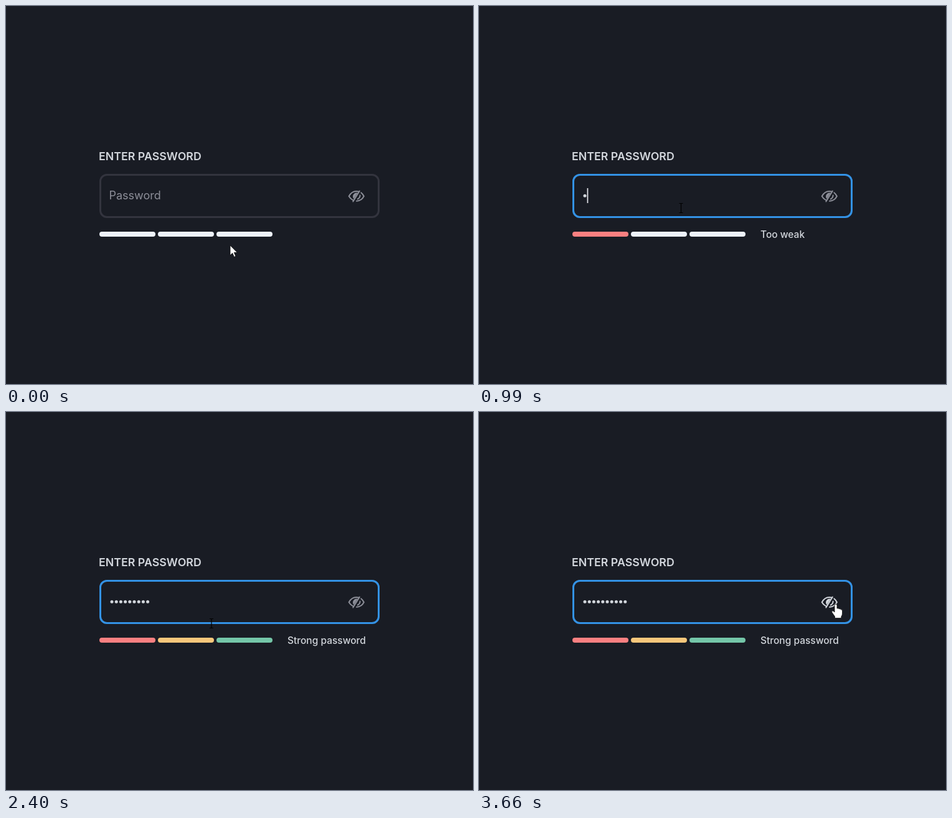
Write an HTML page that moves like this. It is 750 px wide and 608 px high and loops after 3.69 s.

```html
<!DOCTYPE html>
<html lang="en">
<head>
<meta charset="utf-8">
<title>Password strength</title>
<style>
  html, body { margin: 0; width: 100%; height: 100%; overflow: hidden; background: #191c24; }
  svg { display: block; width: 750px; height: 608px; }
  text { font-family: Inter, sans-serif; fill: #d2d6dc; }
  .box { fill: none; stroke-width: 3; }
  #icon { color: #8c8e98; }
  #icon.hover { color: #d2d6dc; }
  .line { fill: none; stroke: currentColor; stroke-width: 2; stroke-linecap: round; }
</style>
</head>
<body>
<svg viewBox="0 0 750 608">
  <text x="149" y="248" font-size="17.8" font-weight="600">ENTER PASSWORD</text>
  <rect class="box" x="151.5" y="271.5" width="447" height="68" rx="10.5" stroke="#33343e"/>
  <rect class="box" x="151.5" y="271.5" width="447" height="68" rx="10.5" stroke="#3392e5" id="focus"/>
  <text x="165.5" y="311" font-size="18" style="fill:#8c8e98" id="placeholder">Password</text>
  <g id="dots" fill="#d2d6dc"></g>
  <rect id="caret" y="293" width="1.7" height="24" fill="#e6e9ee"/>

  <g id="icon">
    <path class="line" d="M557.5 312.5Q553 310 550.7 306Q555 298 562.5 298Q565 298 567 298.6"/>
    <path class="line" d="M570.3 300.2Q573.3 302.5 574.8 306Q571 313.3 563 313.8"/>
    <path d="M564.8 300.5A6 6 0 0 0 558.6 310.2Z" fill="currentColor"/>
    <path class="line" d="M567.8 297.5L557.3 314.5" stroke-width="2.2"/>
    <path class="line" d="M568.6 304.5Q568.6 308.5 564.8 310.5" stroke-width="1.6"/>
  </g>

  <g id="bars"></g>
  <text x="452" y="373.3" font-size="15.5" font-weight="500" id="label"></text>

  <g id="pointer">
    <path id="arrow" d="M0 0V16L3.7 12.5L6.4 18.5L8.9 17.4L6.3 11.6H11.3Z" fill="#fff" stroke="#111" stroke-width=".8"/>
    <path id="beam" d="M-3 -7.5H-.8L0 -6.8L.8 -7.5H3M0 -6.8V6.8M-3 7.5H-.8L0 6.8L.8 7.5H3" fill="none" stroke="#000" stroke-width="1.2"/>
    <path id="hand" d="M-2 2Q-2 0 0 0Q2 0 2 2V7Q4 6 5.3 7.7Q7.2 7 8.2 8.7Q10.5 8.2 10.5 11V15Q10.5 18 8.8 20V22.5H-1.5V20L-6 13.5Q-7 11 -5 10.8Q-3.5 11 -2 13Z" fill="#fff" stroke="#111" stroke-width=".8"/>
  </g>
</svg>
<script>
const LOOP = 3690, FOCUS = 360, BLINK = 300, STEP = 7.2;
const keyTimes = [870, 1050, 1170, 1290, 1410, 1530, 1710, 1860, 2070, 2520];
const levels = [
  { min: 1, color: '#fb8081', label: 'Too weak' },
  { min: 5, color: '#f8c77b', label: 'Could be stronger' },
  { min: 8, color: '#74c6a8', label: 'Strong password' }
];
// time, x, y of the pointer hotspot
const route = [
  [0, 360, 385], [60, 360, 385], [330, 324.5, 325], [1200, 324.5, 325], [1500, 325, 326],
  [2100, 325, 326], [2370, 330, 340], [2580, 330, 340], [2850, 555, 333], [3060, 573, 309], [LOOP, 573, 309]
];

const $ = id => document.getElementById(id);
const show = (el, on) => el.setAttribute('visibility', on ? 'visible' : 'hidden');
const clamp = v => Math.max(0, Math.min(1, v));

function add(parent, tag, attrs) {
  const el = document.createElementNS('http://www.w3.org/2000/svg', tag);
  for (const name in attrs) el.setAttribute(name, attrs[name]);
  return parent.appendChild(el);
}

const dots = keyTimes.map((_, i) => add($('dots'), 'circle', { cx: 170 + i * STEP, cy: 305.2, r: 2.5 }));
const bars = levels.map((_, i) => add($('bars'), 'rect', { x: 150 + i * 94, y: 363, width: 90, height: 8, rx: 4 }));

function pointerAt(t) {
  const i = Math.max(1, route.findIndex(p => p[0] > t));
  const [t0, x0, y0] = route[i - 1], [t1, x1, y1] = route[i];
  const u = clamp((t - t0) / (t1 - t0)), e = u * u * (3 - 2 * u);
  return [x0 + (x1 - x0) * e, y0 + (y1 - y0) * e];
}

function draw(t) {
  const count = keyTimes.filter(k => k <= t).length;
  const level = levels.filter(l => count >= l.min).length;
  const lastInput = count ? keyTimes[count - 1] : FOCUS;

  $('focus').setAttribute('opacity', clamp((t - FOCUS) / 100));
  show($('placeholder'), !count);
  dots.forEach((dot, i) => show(dot, i < count));
  $('caret').setAttribute('x', count ? 166.4 + count * STEP : 166);
  show($('caret'), t >= FOCUS && Math.floor((t - lastInput) / BLINK) % 2 === 0);

  bars.forEach((bar, i) => bar.setAttribute('fill', i < level ? levels[i].color : '#edf2fb'));
  $('label').textContent = level ? levels[level - 1].label : '';

  const [x, y] = pointerAt(t);
  const onIcon = x > 549 && x < 577 && y > 294 && y < 318;
  const inField = y <= 341;
  $('pointer').setAttribute('transform', `translate(${x} ${y})`);
  show($('arrow'), !inField);
  show($('beam'), inField && !onIcon);
  show($('hand'), onIcon);
  $('icon').classList.toggle('hover', onIcon);
}

const start = performance.now();
function tick() {
  draw((performance.now() - start) % LOOP);
  requestAnimationFrame(tick);
}
tick();
</script>
</body>
</html>
```
